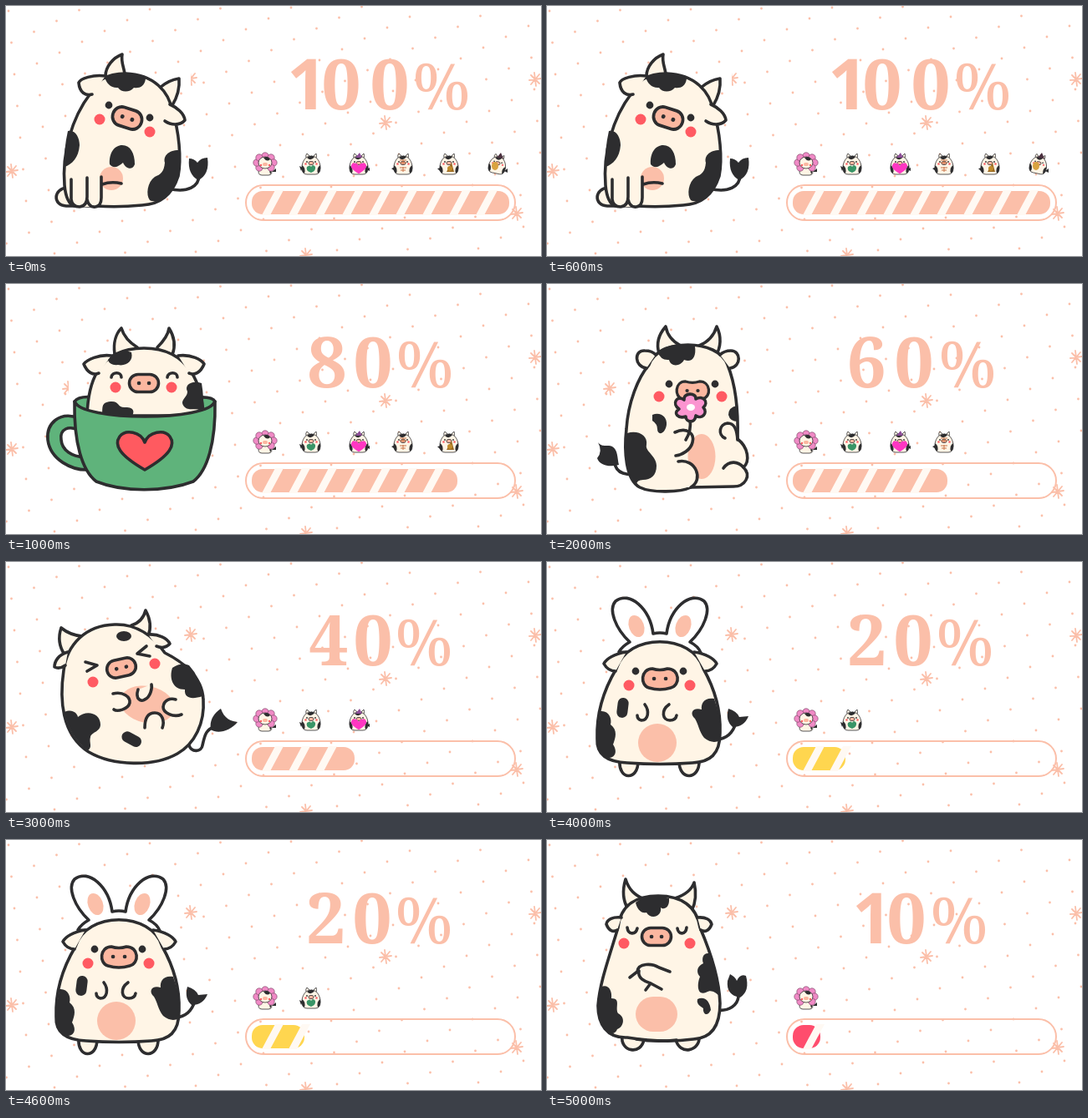
Recreate the animation shown at these times as an HTML page. Size 640x300 px, loop 6000 ms.

```html
<!DOCTYPE html>
<html lang="en">
<head>
<meta charset="utf-8">
<title>Cow countdown</title>
<style>
html, body { margin: 0; width: 100%; height: 100%; overflow: hidden; background: #fff; }
svg { display: block; width: 100%; height: 100%; }
.scene { visibility: hidden; animation: show 6s step-end infinite; }
@keyframes show {
  0% { visibility: visible; }
  16.6666%, 100% { visibility: hidden; }
}
.cow { fill: #fff5e6; stroke: #2d2d2f; stroke-width: 3.6; stroke-linecap: round; stroke-linejoin: round; }
.line { fill: none; }
.spot { fill: #2d2d2f; stroke: none; }
.peach { fill: #fbbfa9; stroke: none; }
.blush { fill: #ff5a62; stroke: none; }
.nose { fill: #fbb7a0; }
.white { fill: #fff; }
.green { fill: #5fb37b; }
.star { fill: none; stroke: #fbbfa9; stroke-width: 1.8; stroke-linecap: round; }
.count { font: 700 84px "Noto Serif", serif; fill: #fbbfa9; text-anchor: middle; }
.one { font-family: "Open Sans", sans-serif; }
.percent { font-size: 77px; font-weight: 500; }
.mini { fill: #fff5e6; stroke: #2d2d2f; stroke-width: .8; }
</style>
</head>
<body>
<svg id="stage" viewBox="0 0 640 300" preserveAspectRatio="none">
  <defs>
    <path id="star" class="star" d="M-1-8L1 8M-7 1L7-1M-5-5L5 5M5-6L-5 6"/>
    <g id="snout">
      <rect class="nose" x="-17.5" y="-10.5" width="35" height="21" rx="10.5"/>
      <path class="line" d="M-6 0h.1M6 0h.1" stroke-width="4.6"/>
    </g>
    <g id="bean">
      <path class="nose" d="M-9-12Q0-9 9-12C24-12 25 8 13 11Q0 15-13 11C-24 8-23-12-9-12Z"/>
      <path class="line" d="M-7 0h.1M7 0h.1" stroke-width="4.6"/>
    </g>
    <path id="heart" d="M0 22C-31 4-37-8-30-18C-23-27-5-24 0-11C5-24 23-27 30-18C37-8 31 4 0 22Z"/>

    <g id="mini" class="mini">
      <path d="M-6-8Q-7-11-5-13L-1-9M2-9L6-13Q7-11 6-7"/>
      <path d="M0-10C7-10 11-3 11 4Q11 12 5 12H-5Q-11 12-11 4C-11-3-7-10 0-10Z"/>
      <path class="spot" d="M-5-8Q0-12 4-9Q0-3-5-8ZM-11 1Q-6 4-8 11Q-12 9-11 1ZM11 1Q6 4 8 11Q12 9 11 1Z"/>
      <circle class="spot" cx="-5" cy="-3" r=".9"/><circle class="spot" cx="5" cy="-3" r=".9"/>
      <rect class="nose" x="-3" y="-3.5" width="6" height="4" rx="2"/>
      <circle class="blush" cx="-6.5" cy="-.5" r="1.2"/><circle class="blush" cx="6.5" cy="-.5" r="1.2"/>
    </g>
    <g id="icon0">
      <path class="mini" d="M-7 3H7Q10 13 4 13H-4Q-10 13-7 3Z"/>
      <path class="spot" d="M5 7Q9 8 6 12ZM8 9L13 5L13 9Z"/>
      <g fill="#f08ac6" stroke="#6d3d5c" stroke-width=".6">
        <circle cy="-10" r="4.2"/><circle cx="7" cy="-8" r="4.2"/><circle cx="10" cy="-2" r="4.2"/>
        <circle cx="7" cy="4" r="4.2"/><circle cx="-7" cy="4" r="4.2"/><circle cx="-10" cy="-2" r="4.2"/>
        <circle cx="-7" cy="-8" r="4.2"/>
      </g>
      <ellipse class="mini" cy="-2" rx="8" ry="7"/>
      <path class="spot" d="M-2-8Q3-11 6-6Q2-2-2-8Z"/>
      <rect class="nose" x="-3" y="-2" width="6" height="4" rx="2"/>
      <circle class="blush" cx="-5" cy="1" r="1.2"/><circle class="blush" cx="5" cy="1" r="1.2"/>
    </g>
    <g id="icon1">
      <use href="#mini"/><path class="spot" d="M-14 2L-10 4L-12 8Z"/>
      <path d="M0 10Q-7 8-5 3Q-1 0 0 3Q2-1 5 3Q6 8 0 10Z" fill="#399567"/>
    </g>
    <g id="icon2">
      <use href="#mini"/><path d="M-4-8L1-14L4-8Z" fill="#8d4e98"/><path class="spot" d="M9 6L13 4L13 8Z"/>
      <use href="#heart" transform="translate(0 5) scale(.28)" fill="#ff36c2"/>
    </g>
    <g id="icon3">
      <use href="#mini"/><path class="spot" d="M-14 5L-9 3L-10 8Z"/>
      <path d="M-4-5H4M-4-2H4M0-5V0M-4 4H4M-3 7H3M0 3V9" stroke="#ca7449" fill="none"/>
    </g>
    <g id="icon4">
      <use href="#mini"/><path class="spot" d="M-14 5L-9 4L-10 9Z"/>
      <path d="M-3 9L3-2L6 9Z" fill="#9a6a22"/><circle cx="1" cy="5" r="3" fill="#c18b2c"/>
    </g>
    <g id="icon5">
      <use href="#mini" transform="rotate(12) scale(.92)"/><path d="M-1-8L4-14L7-7Z" fill="#4b303f"/>
      <ellipse cx="-3" cy="2" rx="4" ry="5" fill="#d9a340"/><path class="spot" d="M8 8L12 5L12 10Z"/>
    </g>

    <g id="cow0" class="cow">
      <path class="line" d="M194 219C218 225 231 216 231 203"/>
      <path class="spot" d="M219 183Q217 202 230 209Q244 202 241 182Q233 182 229 188Q225 183 219 183Z"/>
      <path d="M73 218C57 219 55 239 72 240H88V215Z"/>
      <path d="M119 84C119 73 128 62 139 58C137 68 142 75 142 83M184 98C192 91 200 88 207 87C208 99 205 109 199 119"/>
      <path d="M101 105C105 91 120 81 143 81C177 82 195 103 199 126C207 150 210 183 206 204C198 229 183 238 163 239Q134 242 108 240H82Q72 237 70 215C67 177 78 135 101 105Z"/>
      <path d="M119 84C104 82 89 87 87 92C88 104 95 108 103 106M196 118C205 122 213 129 214 137C208 144 197 143 190 138"/>
      <path class="spot" d="M118 85C130 79 156 79 167 87C166 97 159 99 153 98C148 104 138 104 134 98C126 99 120 93 118 85ZM74 150C83 148 88 158 88 167C87 182 79 190 70 193Q69 172 74 150ZM124 190C123 176 130 167 139 167C149 167 154 177 154 190C151 198 143 195 140 188C136 191 130 197 124 190ZM207 173C193 173 188 181 190 188C189 199 185 202 178 205C169 211 167 227 172 233C183 239 198 225 205 209Q210 191 207 173Z"/>
      <circle class="peach" cx="126" cy="207" r="14"/>
      <path d="M80 211V233Q82 243 97 241Q114 242 113 230V205" stroke="none"/>
      <path class="line" d="M78 208V232Q79 241 88 241Q97 240 97 229V206M97 232Q99 242 107 241Q114 240 114 230V205M115 214Q126 210 138 213"/>
      <circle class="spot" cx="123" cy="119" r="4.4"/><circle class="spot" cx="172" cy="134" r="4.4"/>
      <circle class="blush" cx="112" cy="136" r="6.5"/><circle class="blush" cx="172" cy="151" r="6.5"/>
      <use href="#snout" transform="translate(145 134.5) rotate(18) scale(1.02 1.08)"/>
    </g>

    <g id="cow1" class="cow">
      <path class="green" d="M88 161C63 152 48 168 50 187C53 211 79 224 99 223L94 208C79 207 67 200 66 187C64 174 75 169 88 176Z"/>
      <path class="green" d="M82 141Q87 134 105 136H230Q247 135 250 141Q240 160 166 160Q91 160 82 141Z"/>
      <path d="M130 84C128 70 132 59 138 53C141 63 149 71 157 76M181 76C189 68 194 61 195 53C202 64 203 74 199 85"/>
      <path d="M97 158C98 125 106 77 165 77C222 77 235 126 236 158Z"/>
      <path d="M126 86C111 84 97 91 93 96C97 106 104 110 111 107M206 86C222 84 234 91 237 96C233 106 226 110 219 107"/>
      <path class="spot" d="M122 91C130 81 143 79 150 82C153 93 143 99 134 97Q124 98 122 91ZM234 119C222 115 213 121 217 129C217 137 207 139 213 147C219 154 230 146 236 155Q237 137 234 119ZM115 157C116 149 113 142 125 141C136 140 133 149 143 148C154 148 154 154 150 160Z"/>
      <path class="line" d="M126 112C127 105 138 105 138 112M193 112C194 105 205 105 205 112"/>
      <circle class="blush" cx="131" cy="124" r="6.5"/><circle class="blush" cx="198" cy="124" r="6.5"/>
      <use href="#snout" transform="translate(165 119)"/>
      <path class="green" d="M82 141C90 165 242 165 250 141C251 190 241 224 224 237C190 250 140 250 108 237C91 224 81 190 82 141Z"/>
      <use href="#heart" x="166" y="201" fill="#ff5a60"/>
    </g>

    <g id="cow2" class="cow">
      <path class="line" d="M81 214C82 228 96 230 112 228"/>
      <path class="spot" d="M61 190C66 197 73 192 78 195C85 199 84 209 86 217C75 220 63 218 60 209Q67 201 61 190Z"/>
      <path d="M134 83C130 70 135 59 142 51C144 62 150 69 160 74M182 74C194 69 200 61 203 51C209 63 208 76 202 86"/>
      <path d="M122 97C132 65 205 65 216 97C225 119 229 152 228 186C241 196 243 213 235 220C245 230 237 243 223 243L172 244C160 250 125 251 111 244C94 235 92 200 95 174C97 142 109 112 122 97Z"/>
      <path d="M119 101C104 99 104 79 117 80Q126 80 130 85M219 101C233 99 232 80 220 80Q212 80 207 85"/>
      <path class="spot" d="M132 81C146 71 162 71 177 75C179 88 173 95 164 91C160 99 148 100 146 91Q136 92 132 81ZM126 157C136 153 144 160 143 169C141 181 132 182 132 174Q132 168 126 164ZM96 179C109 175 121 182 119 193C117 201 131 206 131 218C131 230 124 235 115 235Q107 235 107 241C93 226 92 200 96 179ZM227 146Q217 148 217 157Q219 165 228 165Z"/>
      <ellipse class="peach" cx="185" cy="207" rx="16.5" ry="27"/>
      <path d="M153 178C168 171 177 180 174 190C172 199 162 205 154 206M157 213C178 209 188 235 172 244H145Z" stroke="none"/>
      <path class="line" d="M153 178C168 171 177 180 174 190C172 199 162 205 154 206M157 213C178 209 188 235 172 244M213 185C204 181 206 168 216 167C224 167 227 174 228 187M211 221C218 211 229 213 235 220"/>
      <circle class="spot" cx="146" cy="120" r="4.4"/><circle class="spot" cx="201" cy="120" r="4.4"/>
      <circle class="blush" cx="134" cy="135" r="6.5"/><circle class="blush" cx="209" cy="135" r="6.5"/>
      <use href="#bean" transform="translate(174 128) scale(.92)"/>
      <path class="line" d="M171 162Q173 176 166 187"/>
      <path fill="#fb94d0" d="M164 139C163 130 179 130 178 138C187 133 194 142 187 148C193 155 185 163 178 158C177 168 166 166 166 159C157 162 150 155 158 150C149 144 155 133 164 139Z"/>
      <ellipse class="white" cx="172" cy="148" rx="5" ry="4" stroke="none"/>
    </g>

    <g id="cow3" class="cow">
      <path class="line" d="M219 220C222 229 234 228 235 220C238 206 240 201 249 198"/>
      <path class="spot" d="M257 176C261 188 269 191 277 192C268 203 253 207 245 201C243 190 249 181 257 176Z"/>
      <path d="M91 89C80 88 72 84 66 79C62 91 64 102 70 111M150 76C160 73 165 66 167 58C173 69 174 79 170 89"/>
      <path d="M69 130C73 99 95 76 130 75C157 74 177 90 190 109C208 118 235 136 236 165C238 193 226 218 205 230C177 246 128 245 99 228C66 207 64 164 69 130Z"/>
      <path d="M74 108C63 111 58 119 58 126Q64 129 71 124M170 87C183 86 193 92 196 98Q190 105 180 101"/>
      <ellipse class="spot" cx="141" cy="89" rx="9" ry="6"/>
      <path class="spot" d="M70 180C79 176 85 181 86 186C96 177 113 181 113 195C113 204 102 204 101 210C99 217 104 222 98 226Q76 210 70 180ZM199 127C207 121 215 122 219 124Q233 139 235 161C223 165 213 164 214 153C199 153 195 139 199 127Z"/>
      <rect class="spot" x="138" y="206" width="25" height="13" rx="6.5" transform="rotate(28 150 212)"/>
      <ellipse class="peach" cx="169" cy="171" rx="33" ry="22" transform="rotate(12 169 171)"/>
      <path d="M128 158C140 155 149 162 148 169C146 177 133 180 129 177M158 153C154 165 162 168 166 165C173 162 175 151 174 147M166 199C166 186 171 181 178 181C187 181 190 191 187 199M210 183C200 187 188 181 188 174C189 165 197 163 203 165"/>
      <path class="line" d="M95 120L109 124L97 131M168 101L157 110L172 113"/>
      <circle class="blush" cx="104" cy="144" r="6.5"/><circle class="blush" cx="178" cy="122" r="6.5"/>
      <use href="#snout" transform="translate(138 127) rotate(-13)"/>
    </g>

    <g id="cow4" class="cow">
      <path class="line" d="M203 213C217 212 223 203 226 193"/>
      <path class="spot" d="M217 176Q227 179 230 186L241 185Q236 198 222 198Q213 190 217 176Z"/>
      <path d="M87 238C85 262 109 263 109 239M158 239C158 263 183 262 182 238"/>
      <path class="white" d="M86 108Q90 101 99 96C82 80 73 57 82 47C99 34 123 56 127 86Q135 84 143 86C147 56 171 34 188 47C197 57 188 80 171 96Q181 101 184 109Z"/>
      <ellipse class="peach" cx="107" cy="77" rx="9" ry="13.5" transform="rotate(-20 107 77)"/>
      <ellipse class="peach" cx="163" cy="77" rx="9" ry="13.5" transform="rotate(20 163 77)"/>
      <path d="M83 128C96 85 174 85 187 128C200 151 208 178 207 205C207 231 195 240 174 241Q135 244 96 241C72 240 59 231 60 212C59 182 68 153 83 128Z"/>
      <path d="M95 108C81 110 71 116 68 122Q73 131 82 131M176 108C190 110 200 116 203 122Q198 131 189 131"/>
      <path class="spot" d="M64 179C74 178 78 188 76 195C85 202 82 211 79 219C86 230 79 236 72 235Q57 225 60 204ZM200 164C188 162 184 170 185 177C174 174 170 182 177 188C181 194 182 204 188 211Q198 219 207 214Q208 186 200 164Z"/>
      <rect class="spot" x="84" y="163" width="13" height="24" rx="6.5" transform="rotate(7 91 175)"/>
      <circle class="peach" cx="132" cy="217" r="23"/>
      <path class="line" d="M117 171C123 179 121 190 113 190Q108 189 108 184M146 171C136 178 138 190 147 190Q154 190 155 184"/>
      <circle class="spot" cx="106" cy="131" r="4.4"/><circle class="spot" cx="163" cy="131" r="4.4"/>
      <circle class="blush" cx="98" cy="148" r="6.5"/><circle class="blush" cx="171" cy="148" r="6.5"/>
      <use href="#bean" x="135" y="140"/>
    </g>

    <g id="cow5" class="cow">
      <path class="line" d="M203 204C218 206 228 198 229 188"/>
      <path class="spot" d="M219 161Q225 164 227 169Q231 160 238 163Q243 181 231 189Q214 186 216 169Z"/>
      <path d="M90 235C87 254 113 259 116 239M154 239C158 259 184 254 182 235"/>
      <path d="M97 83C89 70 91 57 94 47C98 60 105 66 116 71M153 70C165 66 173 60 176 51C179 64 178 75 173 85"/>
      <path d="M85 105C88 77 108 67 133 67C160 67 179 79 183 105C195 133 206 166 207 196C207 225 195 238 175 239Q139 244 96 237C71 238 61 220 61 199C63 171 74 142 85 105Z"/>
      <path d="M89 93C79 92 72 95 71 101C74 109 79 111 84 108M180 93C190 92 196 96 197 101C194 109 189 111 184 108"/>
      <path class="spot" d="M106 75C117 66 135 66 146 70C147 82 139 84 136 81C138 92 124 96 119 87C112 89 107 81 106 75ZM65 176C74 173 78 181 77 190C89 190 81 201 85 208C95 213 91 225 84 227C81 236 71 231 67 225C59 208 60 192 65 176ZM194 136C186 135 185 143 187 148C178 152 179 160 183 164C179 174 180 187 190 183C197 179 201 183 206 187Q202 158 194 136ZM180 191C189 187 195 194 196 204C191 214 186 207 187 202Q178 197 180 191Z"/>
      <rect class="peach" x="106" y="188" width="50" height="42" rx="21"/>
      <path class="line" d="M107 239Q130 243 155 240M99 165L108 158C109 147 126 148 134 153L147 158M110 157C108 167 119 170 124 172L137 179M124 172L118 180"/>
      <path class="line" d="M96 105C97 114 106 114 108 106M156 106C157 114 166 114 167 105"/>
      <circle class="blush" cx="92" cy="124" r="6.5"/><circle class="blush" cx="171" cy="124" r="6.5"/>
      <use href="#snout" transform="translate(131 116)"/>
    </g>
  </defs>

  <g id="dots" fill="#fbbfa9"></g>
  <g>
    <use href="#star" x="7" y="198"/><use href="#star" x="454" y="140"/><use href="#star" x="633" y="88"/>
    <use href="#star" x="611" y="249"/><use href="#star" x="359" y="299"/>
  </g>
  <rect x="287" y="215" width="322" height="42" rx="21" fill="none" stroke="#fbbfa9" stroke-width="2"/>
</svg>
<script>
const stage = document.getElementById("stage");
const PEACH = "#fbbfa9";

const scenes = [
  { text: "100%", x: [360, 401, 459, 521], end: 602, star: [221, 87], cut: "inset(0 0 0 50%)" },
  { text: "80%", x: [384, 439, 501], end: 540, star: [75, 125], cut: "inset(0 50% 0 0)" },
  { text: "60%", x: [382, 439, 503], end: 479, star: [75, 125] },
  { text: "40%", x: [386, 439, 500], end: 417, star: [221, 87] },
  { text: "20%", x: [383, 438, 500], end: 357, star: [221, 87], color: "#ffd64f" },
  { text: "10%", x: [389, 430, 493], end: 327, star: [221, 87], color: "#ff4d6d" }
];
const iconX = [310, 365, 422, 475, 530, 588];
const glyphClass = { "1": "one", "%": "percent" };

// A loose slanted grid of speckles.
let dots = "";
for (let row = -2; row < 18; row++) {
  for (let col = -1; col < 25; col++) {
    const x = 10 + 27 * col + 3.5 * row, y = 82 - 13 * col + 38 * row;
    if (x > 0 && x < 640 && y > 0 && y < 300) dots += `<circle cx="${x}" cy="${y}" r="1.4"/>`;
  }
}
document.getElementById("dots").innerHTML = dots;

function bar(end, color = PEACH) {
  let art = `<rect x="294" y="222" width="${end - 294}" height="28" rx="13" fill="${color}"/>`;
  for (let x = 322; x < end; x += 32)
    art += `<path fill="#fff9f3" d="M${x} 221h10l-16 30h-10z"/>`;
  return art;
}

function label({ text, x }) {
  const glyphs = [...text].map((c, i) =>
    `<tspan x="${x[i]}" class="${glyphClass[c] || ""}">${c}</tspan>`);
  return `<text class="count" y="124">${glyphs.join("")}</text>`;
}

scenes.forEach((scene, i) => {
  const group = document.createElementNS(stage.namespaceURI, "g");
  group.setAttribute("class", "scene");
  group.style.animationDelay = `${i - scenes.length}s`;
  const [sx, sy] = scene.star;
  const icons = iconX.slice(0, scenes.length - i)
    .map((x, n) => `<use href="#icon${n}" x="${x}" y="190"/>`).join("");
  group.innerHTML = `<use href="#star" x="${sx}" y="${sy}" style="clip-path:${scene.cut || "none"}"/>`
    + `<use href="#cow${i}"/>` + label(scene) + icons + bar(scene.end, scene.color);
  stage.append(group);
});
</script>
</body>
</html>
```
